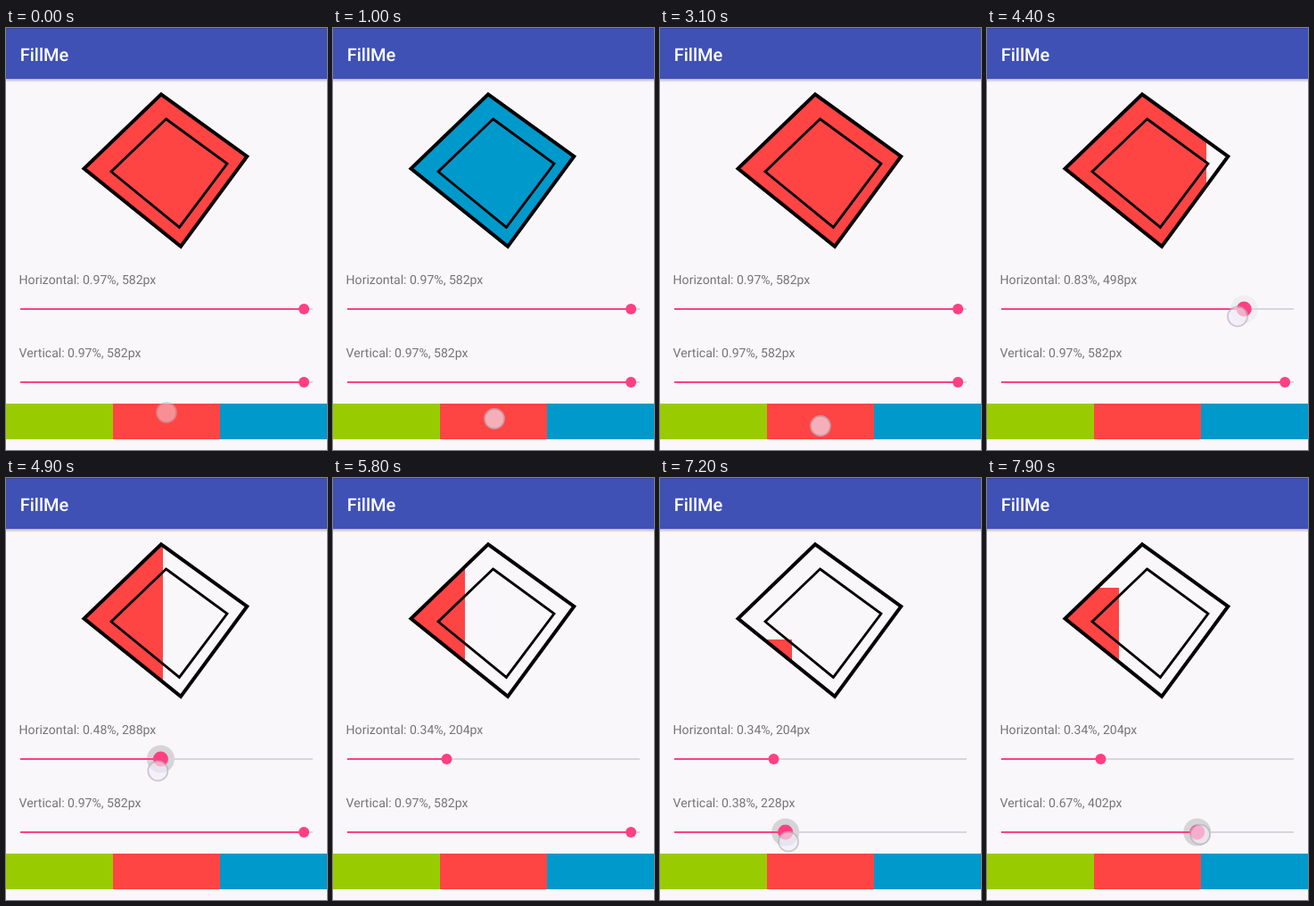
Animation of 360x473 px, one loop 8 s. Source, as an HTML page:

```html
<!DOCTYPE html>
<html lang="en">
<head>
<meta charset="utf-8">
<title>FillMe</title>
<style>
  html, body { margin: 0; width: 100%; height: 100%; overflow: hidden; background: #faf7fb; }
  svg { display: block; width: 360px; height: 473px; }
  text { font: 14.06px Roboto, sans-serif; fill: #757575; text-rendering: geometricPrecision; }
  .title { font-size: 20px; font-weight: 500; fill: #fff; }
  .ink { fill: none; stroke: #000; stroke-miterlimit: 8; }
  .rest { fill: #d9d6db; }
  .done, .thumb { fill: #ff4081; }
  .halo { fill: #000; fill-opacity: .14; }
  .dot { fill: #f1ecfb; fill-opacity: .64; }
  .ring { fill: none; stroke: #b9b3bd; stroke-opacity: .7; stroke-width: 1.8; }
</style>
</head>
<body>
<svg viewBox="0 0 360 473">
  <defs>
    <linearGradient id="shade" x2="0" y2="1">
      <stop stop-color="#000" stop-opacity=".26"/>
      <stop offset="1" stop-color="#000" stop-opacity="0"/>
    </linearGradient>
    <clipPath id="level"><rect id="window" x="80"/></clipPath>
  </defs>

  <rect width="360" height="473" fill="#faf7fb"/>
  <rect y="57" width="360" height="4" fill="url(#shade)"/>
  <rect width="360" height="57" fill="#3f51b5"/>
  <rect width="360" height="1" fill="#364699"/>
  <text class="title" x="15.7" y="36.5">FillMe</text>

  <path id="paint" clip-path="url(#level)" d="M174 74.3 270.3 144 196 244.9 87.5 157.6Z"/>
  <path class="ink" stroke-width="4" d="M174 74.3 270.3 144 196 244.9 87.5 157.6Z"/>
  <path class="ink" stroke-width="2.8" d="M179.5 102 248 152 194.4 223.4 118 161Z"/>

  <g id="sliders"></g>

  <rect y="421" width="120" height="40" fill="#99cc00"/>
  <rect x="120" y="421" width="120" height="40" fill="#ff4444"/>
  <rect x="240" y="421" width="120" height="40" fill="#0099cc"/>

  <g id="touch">
    <circle class="dot" r="10.5"/>
    <circle class="ring" r="11"/>
  </g>
</svg>
<script>
const LOOP = 8000, STEP = 100;
const GREEN = '#99cc00', RED = '#ff4444', BLUE = '#0099cc';
const $ = id => document.getElementById(id);

const ramp = (t, start, length) => Math.min(1, Math.max(0, (t - start) / length));
const easeOut = u => 1 - (1 - u) ** 2;
const easeInOut = u => (1 - Math.cos(Math.PI * u)) / 2;
const knobX = pct => 16 + 3.28 * pct;

const taps = [
  { time: -180, x: 180, y: 431, color: RED },
  { time: 550, x: 292, y: 438, color: BLUE },
  { time: 900, x: 181, y: 438, color: RED },
  { time: 1450, x: 64, y: 441, color: GREEN },
  { time: 2950, x: 180, y: 446, color: RED }
];
const PRESS_TIME = 150;

// value: percent; sag: how far the finger sits below the track
const specs = [
  { name: 'Horizontal', y: 315, from: 4000, to: 5700,
    value: t => 97 - 63 * easeOut(ramp(t, 4250, 1230)),
    press: t => ramp(t, 4300, 400) - ramp(t, 5500, 200),
    sag: pct => 20 - pct / 7 },
  { name: 'Vertical', y: 397, from: 6000, to: LOOP,
    value: t => 97 - 65 * easeInOut(ramp(t, 6100, 950)) + Math.max(0, t - 7050) * .0414,
    press: t => ramp(t, 6100, 300),
    sag: pct => 21.5 - pct / 3.6 }
];

function makeSlider({ name, y, value, press }) {
  const g = document.createElementNS('http://www.w3.org/2000/svg', 'g');
  g.innerHTML = `<text x="14.6" y="${y - 28}"></text>
    <circle class="halo" cy="${y}" r="15.5"/>
    <rect class="rest" x="16" y="${y - 1}" width="328" height="2"/>
    <rect class="done" x="16" y="${y - 1}" height="2"/>
    <circle class="thumb" cy="${y}"/>`;
  $('sliders').append(g);
  const [label, halo, , done, thumb] = g.children;
  return t => {
    const pct = Math.round(value(t)), x = knobX(pct), down = press(t);
    label.textContent = `${name}: ${(pct / 100).toFixed(2)}%, ${pct * 6}px`;
    halo.setAttribute('cx', x);
    halo.setAttribute('opacity', down);
    done.setAttribute('width', x - 16);
    thumb.setAttribute('cx', x);
    thumb.setAttribute('r', 6 + 2.5 * Math.min(1, down * 4));
    return pct * 2;
  };
}
const sliders = specs.map(makeSlider);

function finger(t) {
  const drag = specs.find(s => t >= s.from && t < s.to);
  if (drag) {
    const pct = drag.value(t + 20);
    return [knobX(pct), drag.y + drag.sag(pct), .5 + ramp(t, drag.from, 200) / 2];
  }
  const tap = taps.findLast(p => p.time <= t);
  const age = t - tap.time;
  return [tap.x, tap.y, ramp(age, -50, 100) * (1 - ramp(age, PRESS_TIME, 100))];
}

function draw(t) {
  const [w, h] = sliders.map(update => update(t));
  const win = $('window');
  win.setAttribute('y', 257 - h);
  win.setAttribute('width', w);
  win.setAttribute('height', h);
  $('paint').setAttribute('fill', taps.findLast(p => p.time + PRESS_TIME <= t).color);

  const [x, y, alpha] = finger(t);
  $('touch').setAttribute('transform', `translate(${x} ${y})`);
  $('touch').setAttribute('opacity', alpha);
}

const start = performance.now();
function tick() {
  const t = (performance.now() - start) % LOOP;
  draw(Math.floor(t / STEP) * STEP);
  requestAnimationFrame(tick);
}
tick();
</script>
</body>
</html>
```
